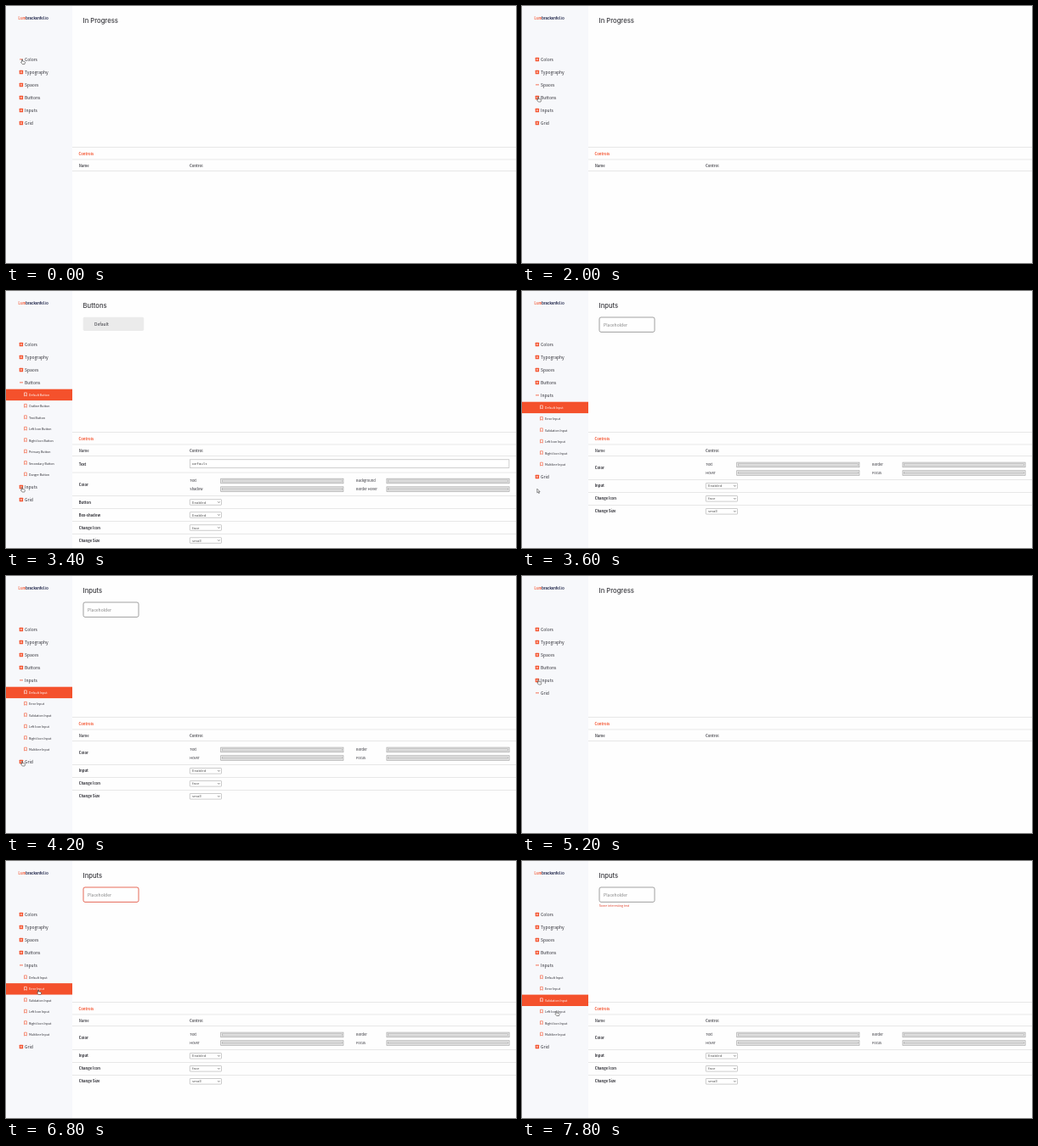
An HTML page for the animation above (8 s loop, 600 by 303 pixels).

```html
<!DOCTYPE html>
<html lang="en">
<head>
<meta charset="utf-8">
<title>Component sidebar</title>
<style>
  html, body { margin: 0; width: 100%; height: 100%; overflow: hidden; background: #fefefe; }
  svg { display: block; width: 600px; height: 303px; }
  text { font: 5px "Noto Sans CJK JP", "Noto Sans", sans-serif; fill: #2c2c33; white-space: pre; }
  .title { font: 500 7.65px Inter, sans-serif; fill: #3a3a3f; }
  .brand { font: 600 4.2px Inter, sans-serif; fill: #0a1038; }
  .sub { font-size: 3.55px; }
  .head { font-size: 4.2px; font-weight: 700; }
  .label { font-size: 4px; }
  .value { font: 4.3px "Noto Sans", sans-serif; fill: #555; }
  .mono { font: 4.2px "Liberation Mono", monospace; fill: #444; }
  .hint { font-size: 3.6px; fill: #e0452f; }
  .orange { fill: #f4512c; }
  .white { fill: #fff; }
  .grey { fill: #828282; }
</style>
</head>
<body>
<svg id="stage" viewBox="0 0 600 303">
  <rect width="78" height="303" fill="#f7f8fb"/>
  <text class="brand" x="14.6" y="16"><tspan class="orange">Lum</tspan>brackenfel.io</text>
  <g id="lines" fill="#dedede"></g>
  <text class="head orange" x="85.5" y="175.5">Controls</text>
  <text class="head" x="85.7" y="189.5" opacity=".8">Name</text>
  <text class="head" x="216" y="189.5" opacity=".8">Control</text>
  <g id="menu"></g>
  <g id="panel"></g>
  <g id="cursor" fill="#fff" stroke="#222" stroke-width=".5" stroke-linejoin="round">
    <path id="hand" d="M-.4 .5Q0-.3 .5 .5V2.5L3 3.1Q3.7 3.4 3.5 4.2L3 6H.2L-1.5 3.9Q-1.4 3-.4 3.7Z"/>
    <path id="arrow" d="M0 0V4.6L1.1 3.7 1.9 5.4 2.6 5.1 1.9 3.4H3.3Z"/>
  </g>
</svg>
<script>
const byId = id => document.getElementById(id);
const items = ["Colors", "Typography", "Spaces", "Buttons", "Inputs", "Grid"];
const subs = {
  Buttons: ["Default", "Outline", "Text", "Left Icon", "Right Icon", "Primary", "Secondary", "Danger"].map(s => s + " Button"),
  Inputs: ["Default", "Error", "Validation", "Left Icon", "Right Icon", "Multiline"].map(s => s + " Input")
};

// [start ms, open item, selected sub-item]
const scenes = [
  [0, "Colors", 0], [600, "Typography", 0], [1000, "Spaces", 0], [2400, "Buttons", 0],
  [3600, "Inputs", 0], [4400, "Grid", 0], [5400, "Inputs", 0], [6600, "Inputs", 1], [7600, "Inputs", 2]
];

// [ms, x, y] of the pointer tip
const path = [
  [0, 19, 62.5], [400, 19, 77], [600, 19, 77.5], [800, 19, 92], [1200, 19, 92.5],
  [1600, 19, 107], [2400, 19, 107], [3400, 18.8, 231], [3600, 17.8, 233.2],
  [4200, 19, 218], [4400, 19, 218], [5200, 19.3, 122], [5600, 19.6, 122.5], [5800, 19.6, 122.5],
  [6400, 37, 150], [6600, 37.5, 150.5], [6800, 38, 151.5], [7200, 38, 151.5],
  [7600, 40, 164], [7800, 40.5, 176.5], [8000, 40.5, 176.5]
];

const text = (s, x, y, cls = "") => `<text class="${cls}" x="${x}" y="${y}">${s}</text>`;
const rect = (x, y, w, h, attrs) => `<rect x="${x}" y="${y}" width="${w}" height="${h}" ${attrs}/>`;
const line = y => rect(78, y, 522, .7, 'fill="#dedede"');

function toggle(y, open) {
  if (open) return rect(16, y - .5, 4, .8, 'fill="#f4512c"');
  return rect(15.7, y - 2.2, 4.4, 4.4, 'rx=".5" fill="#f4512c"') +
    `<path d="M16.7 ${y}h2.4m-1.2-1.2v2.4" stroke="#fff" stroke-width=".6"/>`;
}

function subItem(name, y, selected) {
  const color = selected ? "#fff" : "#f4512c";
  return (selected ? rect(0, y - 6.8, 78, 13.4, 'fill="#f4512c"') : "") +
    `<path d="M21.5 ${y - 2.6}h2.8v3.9l-1.4-.8l-1.4 .8z" fill="none" stroke="${color}" stroke-width=".6"/>` +
    text(name, 27, y + 1.4, selected ? "sub white" : "sub");
}

function menu(open, sub) {
  let y = 63, out = "";
  for (const name of items) {
    out += toggle(y, name === open) + text(name, 22, y + 1.9);
    if (name === open && subs[name]) {
      subs[name].forEach((s, i) => out += subItem(s, y + 14.5 + i * 13.45, i === sub));
      y += subs[name].length * 13.5;
    }
    y += 15;
  }
  return out;
}

const swatch = (x, y) => rect(x + .4, y - 2.6, 144.2, 5.6, 'fill="#ededed" stroke="#a5a5a5" stroke-width=".7"') +
  rect(x + 2, y - .9, 141, 2.2, 'fill="#e6e6e6" stroke="#a8a8a8" stroke-width=".6"');

function colorRow(y, names) {
  return text("Color", 85.7, y + 1.5, "head") + names.map((name, i) => {
    const right = i % 2, rowY = y + (i < 2 ? -4.2 : 5.4);
    return text(name, right ? 412 : 216.3, rowY + 1.4, "label") + swatch(right ? 447.5 : 252.3, rowY);
  }).join("");
}

const selectRow = (y, name, value) => text(name, 85.7, y + 1.5, "head") +
  rect(216.3, y - 3.3, 37.2, 6.6, 'rx=".6" fill="#fff" stroke="#aaa" stroke-width=".6"') +
  text(value, 219, y + 1.5, "value") +
  `<path d="M249.2 ${y - .7}l1.2 1.3 1.2-1.3" fill="none" stroke="#444" stroke-width=".6"/>`;

const selectRows = (y, rows) => rows.map(([name, value], i) =>
  line(y + i * 15 - 7.7) + selectRow(y + i * 15, name, value)).join("");

const buttonsPanel = () => text("Buttons", 90.6, 20.3, "title") +
  rect(90.7, 30.7, 71.5, 16.3, 'rx="1.8" fill="#ebebeb"') +
  text("Default", 104, 41, "") +
  text("Text", 85.7, 206, "head") +
  rect(216.3, 198.8, 375.6, 9.6, 'fill="#fff" stroke="#b0b0b0" stroke-width=".6"') +
  text("Default", 219.2, 205, "mono") + line(213.7) +
  colorRow(228, ["Text", "Background", "Shadow", "Border Hover"]) +
  selectRows(249, [["Button", "Enabled"], ["Box-shadow", "Enabled"], ["Change Icon", "face"], ["Change Size", "small"]]);

const inputsPanel = sub => text("Inputs", 90.6, 20.3, "title") +
  rect(91, 31, 65, 17.4, `rx="2" fill="none" stroke="${sub === 1 ? "#e0452f" : "#8a8a8a"}" stroke-width=".8"`) +
  text("Placeholder", 96, 41.8, "grey") +
  (sub === 2 ? text("Some interesting text", 90.7, 54.3, "hint") : "") +
  colorRow(208.9, ["Text", "Border", "Hover", "Focus"]) +
  selectRows(229.8, [["Input", "Enabled"], ["Change Icon", "face"], ["Change Size", "small"]]);

function panel(open, sub) {
  if (open === "Buttons") return buttonsPanel();
  if (open === "Inputs") return inputsPanel(sub);
  return text("In Progress", 90.6, 20.3, "title");
}

function pointer(t) {
  const i = path.findIndex(p => p[0] > t);
  const [t0, x0, y0] = path[i - 1], [t1, x1, y1] = path[i];
  const k = (t - t0) / (t1 - t0);
  return [x0 + (x1 - x0) * k, y0 + (y1 - y0) * k];
}

byId("lines").innerHTML = [166.2, 180.6, 194.3].map(line).join("");
let shown = null;

function draw(now) {
  const t = Math.floor(now % 8000 / 200) * 200;
  const scene = scenes.filter(s => s[0] <= t).pop();
  if (scene !== shown) {
    byId("menu").innerHTML = menu(scene[1], scene[2]);
    byId("panel").innerHTML = panel(scene[1], scene[2]);
    shown = scene;
  }
  const [x, y] = pointer(t);
  const free = (t >= 3600 && t < 4000) || (t >= 4600 && t < 5000);
  byId("cursor").setAttribute("transform", `translate(${x} ${y})`);
  byId("hand").style.display = free ? "none" : "";
  byId("arrow").style.display = free ? "" : "none";
  requestAnimationFrame(draw);
}
draw(performance.now());
</script>
</body>
</html>
```
